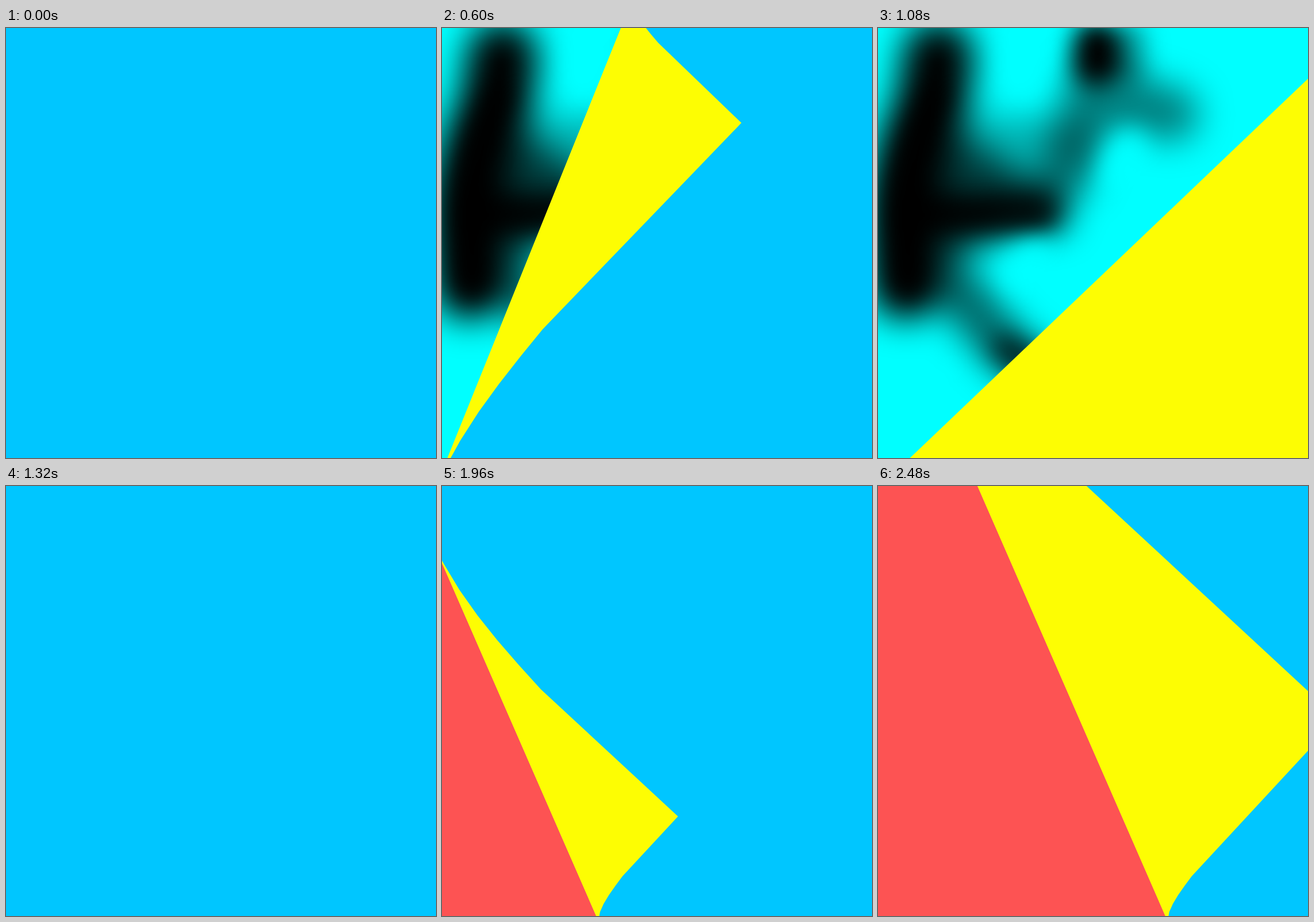
Recreate the animation shown at these times as an HTML page without scripts. Size 748 by 748 pixels, loop 3 s.

```html
<!DOCTYPE html>
<html lang="en">
<head>
<meta charset="utf-8">
<title>Page turn</title>
<style>
@property --t { syntax: "<number>"; inherits: true; initial-value: 0; }
@property --c { syntax: "<number>"; inherits: true; initial-value: 0; }
@property --a { syntax: "<angle>"; inherits: true; initial-value: 20deg; }

html, body { margin: 0; width: 100%; height: 100%; overflow: hidden; }
body {
  position: relative;
  background: #00c6ff;
  animation: clock 3s steps(75) -1ms infinite;
}
@keyframes clock { from { --t: 0; } to { --t: 3000; } }

/* --a: fold direction, --c: contact line of the curl, --X/--Y: page corner */
.turn {
  position: absolute; inset: 0; overflow: hidden;
  opacity: clamp(0, min(var(--t) - var(--from) + 1, var(--till) - var(--t) - 1), 1);
  --rem: clamp(0, (var(--end) - var(--t)) / (var(--end) - var(--from)), 1);
  --C: cos(var(--a));
  --S: sin(var(--a));
}
.first {
  --from: 400; --end: 1160; --till: 1320;
  --X: -87; --Y: -80;
  --c: calc(653.5 - 588 * pow(var(--rem), 2.258));
  --a: calc((47.2 - 43.25 * pow(var(--rem), 1.764)) * 1deg);
}
.second {
  --from: 1600; --end: 2480; --till: 3000;
  --X: -87; --Y: 792;
  --c: calc(228.4 - 475 * pow(var(--rem), 1.53));
  --a: -23.6deg;
}

/* half plane behind the curl */
.under {
  position: absolute; inset: 0;
  --h: calc(var(--c) - 69.5);
  clip-path: polygon(
    calc((var(--C) * var(--h) - var(--S) * 4000) * 1px) calc((var(--S) * var(--h) + var(--C) * 4000) * 1px),
    calc((var(--C) * var(--h) + var(--S) * 4000) * 1px) calc((var(--S) * var(--h) - var(--C) * 4000) * 1px),
    calc(var(--C) * -4000px) calc(var(--S) * -4000px));
}
.second .under { background: #fd5353; }

/* back of the page; u = paper length past the contact line, e = that of the corner */
.flap {
  position: absolute; left: -2000px; top: -2000px; width: 4000px; height: 4000px;
  background: #fdfd03;
  transform: rotate(var(--a));
  --o: calc(var(--c) * 1px + 2000px);
  --e: calc(var(--c) - var(--C) * var(--X) - var(--S) * var(--Y));
  --u0: min(141.4, var(--e));
  --u1: min(164.9, var(--e));
  --u2: min(188.5, var(--e));
  --u3: min(212.1, var(--e));
  --u4: min(235.6, var(--e));
  --u5: min(259.2, var(--e));
  --u6: min(282.7, var(--e));
  --x0: calc(var(--o) - 70px * sin(var(--u0) / 90));
  --x1: calc(var(--o) - 70px * sin(var(--u1) / 90));
  --x2: calc(var(--o) - 70px * sin(var(--u2) / 90));
  --x3: calc(var(--o) - 70px * sin(var(--u3) / 90));
  --x4: calc(var(--o) - 70px * sin(var(--u4) / 90));
  --x5: calc(var(--o) - 70px * sin(var(--u5) / 90));
  --x6: calc(var(--o) - 70px * sin(var(--u6) / 90));
  --l: calc((var(--C) * var(--c) - var(--X)) / var(--S) * 1px + 2000px);
  --m: calc(var(--C) / var(--S) * 1px);
  --p: calc((var(--Y) - var(--S) * var(--c)) / var(--C) * 1px + 2000px);
  --q: calc(var(--S) / var(--C) * 1px);
  clip-path: polygon(
    var(--x0) calc(var(--l) - var(--m) * var(--u0)),
    var(--x1) calc(var(--l) - var(--m) * var(--u1)),
    var(--x2) calc(var(--l) - var(--m) * var(--u2)),
    var(--x3) calc(var(--l) - var(--m) * var(--u3)),
    var(--x4) calc(var(--l) - var(--m) * var(--u4)),
    var(--x5) calc(var(--l) - var(--m) * var(--u5)),
    var(--x6) calc(var(--l) - var(--m) * var(--u6)),
    calc(var(--x6) + (var(--e) - var(--u6)) * 1px) calc(var(--p) + var(--q) * var(--e)),
    var(--x6) calc(var(--p) + var(--q) * var(--u6)),
    var(--x5) calc(var(--p) + var(--q) * var(--u5)),
    var(--x4) calc(var(--p) + var(--q) * var(--u4)),
    var(--x3) calc(var(--p) + var(--q) * var(--u3)),
    var(--x2) calc(var(--p) + var(--q) * var(--u2)),
    var(--x1) calc(var(--p) + var(--q) * var(--u1)),
    var(--x0) calc(var(--p) + var(--q) * var(--u0)));
}

svg { display: block; background: #0ff; }
.ink { fill: none; stroke: #000; stroke-linecap: round; stroke-linejoin: round; }
.soft { filter: blur(30px); }
.fine { filter: blur(20px); }
</style>
</head>
<body>
<div class="turn first">
  <div class="under">
    <svg width="748" height="748" viewBox="0 0 748 748">
      <g class="ink soft">
        <path d="M100 165L225 235L320 275L300 335L130 400L60 330Z" fill="#000" fill-opacity=".75" stroke="none"/>
        <path d="M105 50L95 130Q45 230 42 325L48 445" stroke-width="125"/>
        <path d="M42 322H300" stroke-width="62"/>
        <path d="M110 420L215 550L330 640" stroke-width="85" stroke-opacity=".6"/>
        <path d="M375 100L330 250M375 110L510 150" stroke-width="95" stroke-opacity=".5"/>
        <path d="M180 190L340 200" stroke-width="80" stroke-opacity=".3"/>
      </g>
      <g class="ink fine">
        <path d="M380 28V62" stroke-width="82"/>
        <path d="M435 20V70" stroke-width="60" stroke-opacity=".4"/>
        <path d="M100 115Q45 230 42 325L53 450M42 325H290" stroke-width="34"/>
        <path d="M222 556L300 610" stroke-width="48" stroke-opacity=".7"/>
      </g>
      <g class="fine" fill="#0ff">
        <ellipse cx="262" cy="415" rx="46" ry="30" transform="rotate(-48 262 415)"/>
        <ellipse cx="428" cy="238" rx="34" ry="58" transform="rotate(18 428 238)"/>
        <ellipse cx="252" cy="45" rx="30" ry="75"/>
        <path d="M-60 590H125V800H-60Z"/>
      </g>
    </svg>
  </div>
  <div class="flap"></div>
</div>
<div class="turn second">
  <div class="under"></div>
  <div class="flap"></div>
</div>
</body>
</html>
```
